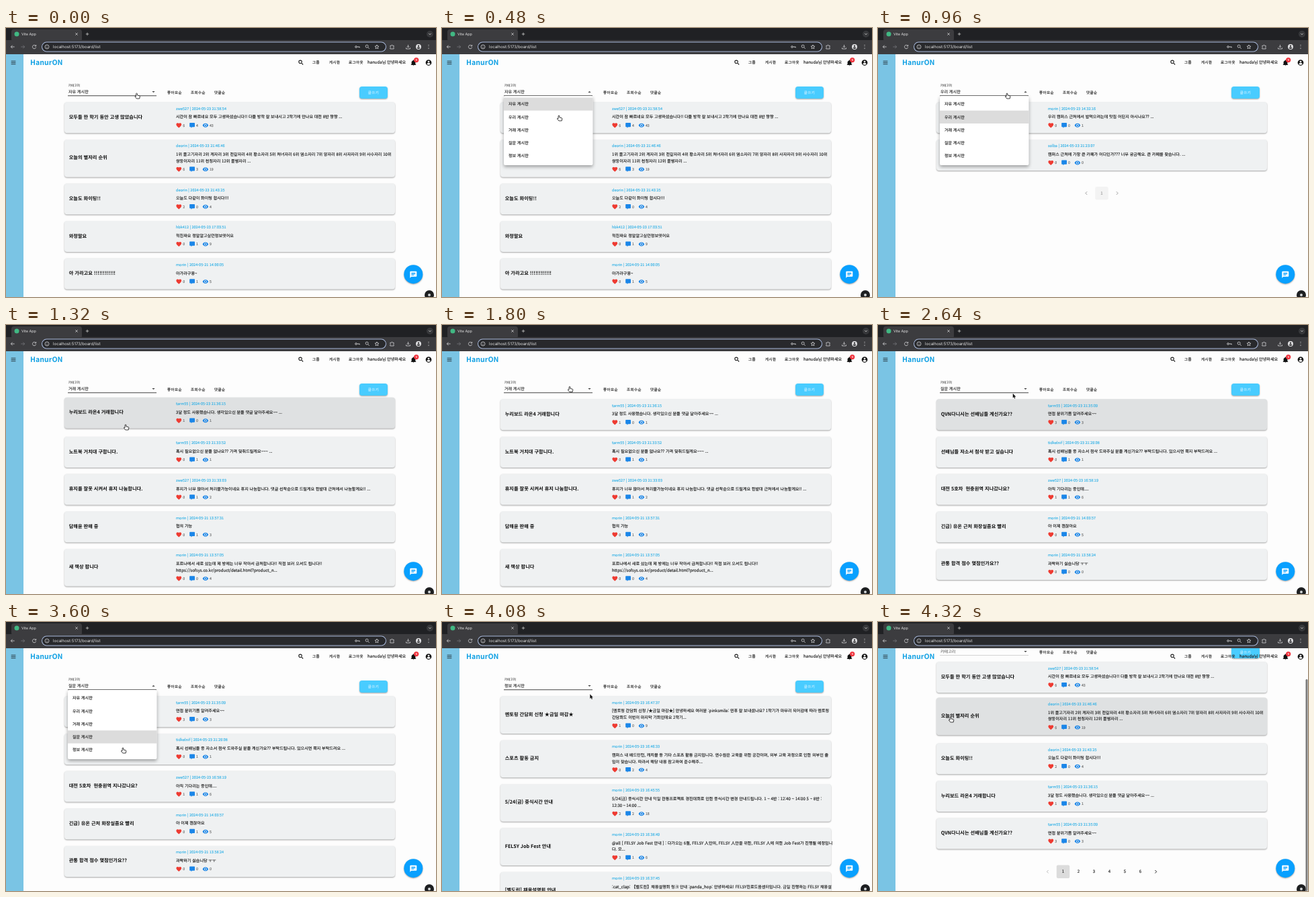
Write an HTML page with a canvas that moves like this. It is 640x400 px and loops after 4.44 s.

```html
<!DOCTYPE html>
<html lang="ko">
<head>
<meta charset="utf-8">
<title>Board</title>
<style>
html, body { margin: 0; width: 100%; height: 100%; overflow: hidden; background: #fdfdfd; }
canvas { display: block; width: 640px; height: 400px; }
</style>
</head>
<body>
<canvas id="stage"></canvas>
<script>
const LOOP = 4440, STEP = 120;
const KO = '"Noto Sans CJK KR", "Noto Sans CJK JP", "Noto Sans", sans-serif';
const UI = 'Inter, sans-serif';
const stage = document.getElementById('stage');
const c = stage.getContext('2d');
const dpr = window.devicePixelRatio || 1;
stage.width = 640 * dpr;
stage.height = 400 * dpr;

// Icons on a 24 unit grid
const ICON = {
  heart: 'M12 21.3l-1.4-1.3C5.4 15.4 2 12.3 2 8.5 2 5.4 4.4 3 7.5 3c1.7 0 3.4.8 4.5 2.1C13.1 3.8 14.8 3 16.5 3 19.6 3 22 5.4 22 8.5c0 3.8-3.4 6.9-8.6 11.5z',
  bubble: 'M20 2H4a2 2 0 0 0-2 2v12a2 2 0 0 0 2 2h4v4l4-4h8a2 2 0 0 0 2-2V4a2 2 0 0 0-2-2z',
  eye: 'M12 4.5C7 4.5 2.7 7.6 1 12c1.7 4.4 6 7.5 11 7.5s9.3-3.1 11-7.5C21.3 7.6 17 4.5 12 4.5zM12 17a5 5 0 1 1 0-10 5 5 0 0 1 0 10zm0-8a3 3 0 1 0 0 6 3 3 0 0 0 0-6z',
  bell: 'M21 19v1H3v-1l2-2v-6c0-3.1 2-5.8 5-6.7V4a2 2 0 0 1 4 0v.3c3 .9 5 3.6 5 6.7v6zM14 21a2 2 0 0 1-4 0z',
  user: 'M12 2a10 10 0 1 0 0 20 10 10 0 0 0 0-20zm0 3.5a3.3 3.3 0 1 1 0 6.6 3.3 3.3 0 0 1 0-6.6zM12 19.5c-2.5 0-4.8-1.3-6-3.2 0-2 4-3.1 6-3.1s6 1.1 6 3.1c-1.2 1.9-3.5 3.2-6 3.2z',
  chat: 'M20 2H4a2 2 0 0 0-2 2v18l4-4h14a2 2 0 0 0 2-2V4a2 2 0 0 0-2-2zM6 9h12v2H6zM14 14H6v-2h8zM18 8H6V6h12z',
  search: 'M15.5 9.5a6 6 0 1 1-12 0 6 6 0 0 1 12 0zM14 14l6.5 6.5',
  back: 'M20 12H4M11 5l-7 7 7 7',
  forward: 'M4 12h16M13 5l7 7-7 7',
  reload: 'M19 8a8 8 0 1 0 1 6M20 3v6h-6',
  info: 'M21 12a9 9 0 1 1-18 0 9 9 0 0 1 18 0zM12 11v6M12 7v1',
  star: 'M12 3l2.7 6 6.3.6-4.8 4.3 1.4 6.4L12 17l-5.6 3.3 1.4-6.4L3 9.6 9.3 9z',
  puzzle: 'M4 7h5a3 3 0 0 1 6 0h5v5a3 3 0 0 0 0 5v4H4v-5a3 3 0 0 0 0-5z',
  download: 'M12 3v11M7 10l5 5 5-5M3 16v5h18v-5',
  key: 'M2 12a4 4 0 1 0 8 0 4 4 0 1 0-8 0M10 12h12v4M18 12v3',
  close: 'M5 5l14 14M19 5L5 19',
  plus: 'M12 3v18M3 12h18',
  down: 'M6 9l6 6 6-6',
  left: 'M15 6l-6 6 6 6',
  right: 'M9 6l6 6-6 6',
  menu: 'M3 6h18M3 12h18M3 18h18',
  dots: 'M12 4v2M12 11v2M12 18v2'
};
const HAND = new Path2D('M-.9 .6Q0-.6 .9 .6V3L4 3.7Q5 4 4.8 5L4.2 8H-.2L-2.6 5Q-2.6 3.7-.9 4.6z');
const ARROW = new Path2D('M0 0V6.6L1.5 5.3 2.5 7.6 3.6 7.1 2.6 4.9H4.6z');

// title | author | time | likes, comments, views | body lines
const post = row => {
  const [title, author, time, counts, ...body] = row.split('|');
  return { title, meta: `${author} | 2024-05-${time}`, counts: counts.split(' '), body };
};
const free = [
  '모두들 한 학기 동안 고생 많았습니다|zwe527|23 21:58:54|6 4 43|시간이 참 빠르네요 모두 고생하셨습니다!! 다들 방학 잘 보내시고 2학기에 만나요 대전 8반 짱짱 ...',
  '오늘의 별자리 순위|deorin|23 21:46:46|6 3 19|1위 물고기자리 2위 게자리 3위 전갈자리 4위 황소자리 5위 처녀자리 6위 염소자리 7위 양자리 8위 사자자리 9위 사수자리 10위|쌍둥이자리 11위 천칭자리 12위 물병자리 ...',
  '오늘도 화이팅!!|deorin|23 21:43:25|2 0 4|오늘도 다같이 화이팅 합시다!!!',
  '와정말요|hbk412|23 17:03:51|0 1 9|헉진짜요 정말알고싶던정보엿어요',
  '아 가라고요 !!!!!!!!!!!!|morin|21 14:00:05|0 1 5|아가라구용~'
].map(post);
const trade = [
  '누리보드 라온4 거래합니다|tarm55|23 21:36:15|1 0 1|3달 정도 사용했습니다. 생각있으신 분들 댓글 달아주세요~~ ...',
  '노트북 거치대 구합니다.|tarm55|23 21:33:52|0 1 1|혹시 필요없으신 분들 없나요?? 가격 맞춰드릴게요~~~ ...',
  '휴지를 잘못 시켜서 휴지 나눔합니다.|zwe527|23 21:33:03|0 1 2|휴지가 너무 많아서 처리불가능이네요 휴지 나눔합니다. 댓글 선착순으로 드릴게요 한밭대 근처에서 나눔할게요!! ...',
  '담해윤 판매 중|morin|21 13:57:31|0 1 3|협의 가능',
  '새 책상 팝니다|morin|21 13:57:05|0 0 4|포르나에서 새로 샀는데 제 방에는 너무 작아서 급처합니다!! 직접 보러 오셔도 됩니다!!|https://sofsys.co.kr/product/detail.html?product_n...'
].map(post);
const ask = [
  'QVN다니시는 선배님들 계신가요??|tarm55|23 21:35:09|3 0 3|면접 분위기좀 알려주세요~~',
  '선배님들 자소서 첨삭 받고 싶습니다|tidkelnif|23 21:29:08|0 1 1|혹시 선배님들 중 자소서 첨삭 도와주실 분들 계신가요?? 부탁드립니다. 있으시면 쪽지 부탁드려요 ...',
  '대전 5호차  현충원역 지나갔나요?|zwe527|23 16:58:19|1 1 6|아직 기다리는 중인데....',
  '긴급) 유온 근처 화장실좀요 빨리|morin|21 14:03:57|0 1 5|아 이제 괜찮아요',
  '관통 합격 점수 몇점인가요??|morin|21 13:58:24|0 0 0|과락하기 싫습니당 ㅜㅜ'
].map(post);
const ours = [
  '점심 맛집 추천해주세요|morin|23 14:32:16|0 0 1|우리 캠퍼스 근처에서 밥먹으려는데 맛집 어딘지 아시나요?? ...',
  '카페 추천 받습니다|solba|23 21:23:07|0 0 0|캠퍼스 근처에 가장 큰 카페가 어디인가??? 너무 궁금해요. 큰 카페를 찾습니다. ...'
].map(post);
const news = [
  '멘토링 간담회 신청 ★금일 마감★|morin|23 16:47:37|1 0 9|[멘토링 간담회 신청 /★금일 마감★] 안녕하세요 여러분 :pinksmile: 연휴 잘 보내셨나요? 1학기가 마무리 되어감에 따라 멘토링|간담회도 이번이 마지막 기회인데요 2학기...',
  '스포츠 활동 금지|morin|23 16:46:33|0 2 4|캠퍼스 내 배드민턴, 캐치볼 등 기타 스포츠 활동 금지입니다. 연수원은 교육을 위한 공간이며, 외부 교육 과정으로 인한 외부인 출|입이 잦습니다. 따라서 해당 내용 참고하여 준수해주...',
  '5/24(금) 중식시간 안내|morin|23 16:45:55|2 2 18|5/24(금) 중식시간 안내 익일 관통프로젝트 경진대회로 인한 중식시간 변경 안내드립니다. 1 ~ 4반 : 12:40 ~ 14:00 5 ~ 8반 :|12:30 ~ 14:00 ...',
  'FELSY Job Fest 안내|morin|23 16:38:49|3 1 6|@all [ FELSY Job Fest 안내 ] : 다가오는 6월, FELSY 人만의, FELSY 人만을 위한, FELSY 人에 의한 Job Fest가 진행될 예정입니|다. 모...',
  '[벨도린] 채용설명회 안내|morin|23 16:37:45|1 0 5|:cat_clap: 【벨도린】채용설명회 링크 안내 :panda_hop: 안녕하세요! FELSY진로도움센터입니다. 금일 진행하는 FELSY 채용설|명회 링크 안내드립니다...'
].map(post);
const boards = { 자유: free, 우리: ours, 거래: trade, 질문: ask, 정보: news };
const all = [...free.slice(0, 3), trade[0], ask[0]];

// time, selected board, menu open
const STATES = [
  [0, '자유', 0], [120, '자유', 1], [600, '우리', 0], [960, '우리', 1], [1320, '거래', 0],
  [1920, '거래', 1], [2400, '질문', 0], [3360, '질문', 1], [3720, '정보', 0], [4200, '', 0]
];
// time, x, y of the pointer tip
const PATH = [
  [0, 194.5, 97], [120, 194, 97], [480, 174, 130], [600, 175, 129], [840, 192, 97], [960, 192, 97],
  [1200, 178, 148], [1320, 178, 148], [1560, 190, 91.5], [1920, 190, 91.5], [2280, 176, 167],
  [2400, 176, 167], [2640, 200.7, 101.8], [2880, 200.7, 101.8], [3120, 195, 95], [3360, 195, 95],
  [3600, 174, 187], [3720, 175, 186], [3960, 220.3, 107.3], [4080, 220.3, 107.3], [4320, 108, 141]
];

function pointer(t) {
  const i = PATH.findIndex(p => p[0] >= t);
  if (i < 1) return PATH[0].slice(1);
  const [a, b] = [PATH[i - 1], PATH[i]], k = (t - a[0]) / (b[0] - a[0]);
  return [1, 2].map(n => a[n] + (b[n] - a[n]) * k);
}

// y is the middle of the capitals; laid out at ten times the size for exact advances
function text(s, x, y, size, color, { weight = 400, font = KO, align = 'left', space = 0 } = {}) {
  c.save();
  c.translate(x, y + size * .36);
  c.scale(.1, .1);
  c.font = `${weight} ${size * 10}px ${font}`;
  c.textRendering = 'geometricPrecision';
  c.letterSpacing = space * 10 + 'px';
  c.textAlign = align;
  c.fillStyle = c.strokeStyle = color;
  c.fillText(s, 0, 0);
  // a hairline brings regular Korean text to a medium weight
  if (font === KO && weight === 400) {
    c.lineWidth = size * .25;
    c.lineJoin = 'round';
    c.strokeText(s, 0, 0);
  }
  c.restore();
}

function box(x, y, w, h, color, r = 0, shadow = 0) {
  c.save();
  if (shadow) {
    c.shadowColor = 'rgba(0,0,0,.35)';
    c.shadowBlur = shadow;
    c.shadowOffsetY = shadow / 2;
  }
  c.fillStyle = color;
  c.beginPath();
  c.roundRect(x, y, w, h, r);
  c.fill();
  c.restore();
}

const disc = (x, y, r, color, shadow) => box(x - r, y - r, 2 * r, 2 * r, color, r, shadow);

function icon(name, x, y, size, color, line = 0) {
  const path = new Path2D(ICON[name]), k = size / 24;
  c.save();
  c.translate(x - size / 2, y - size / 2);
  c.scale(k, k);
  c.fillStyle = c.strokeStyle = color;
  c.lineWidth = line / k;
  if (line) c.stroke(path); else c.fill(path, 'evenodd');
  c.restore();
}

function browser() {
  box(0, 0, 640, 18, '#202124');
  box(8, 2, 105, 18, '#3c3c3f', 4);
  box(0, 18, 640, 21, '#3c3c3f');
  disc(16, 9, 3.5, '#41b883');
  text('Vite App', 23, 9, 5.45, '#e3e3e3', { font: UI });
  icon('close', 105, 9, 6, '#ddd', .7);
  icon('plus', 121, 9, 6, '#ddd', .7);
  disc(631, 9, 5, '#37383b');
  icon('down', 631, 9, 7, '#ddd', .8);
  box(53, 20.5, 513, 15, '#a9b9dc', 7.5);
  box(54, 21.5, 511, 13, '#28292c', 6.5);
  text('localhost:5173/board/list', 70, 28, 6.1, '#e6e6e6', { font: UI });
  const tools = { back: 10, reload: 42, info: 61, key: 523, search: 538, star: 552, puzzle: 574.5, download: 598.5, dots: 629 };
  for (const name in tools) icon(name, tools[name], 28, 8, '#d5d5d7', name === 'dots' ? 1.4 : .8);
  icon('forward', 25, 28, 8, '#77787b', .8);
  icon('user', 614, 28, 9.5, '#e4e4e6');
}

function header() {
  box(0, 39, 26, 361, '#7ac4e4');
  icon('menu', 11, 51.5, 9, '#26343b', .9);
  text('HanurON', 36, 51.3, 10.6, '#12a1e4', { weight: 700 });
  icon('search', 439, 51.3, 9, '#222', 1.1);
  text('그룹', 456, 51.3, 5.5, '#222', { space: .4 });
  text('게시판', 481, 51.3, 5.5, '#222', { space: .4 });
  text('로그아웃', 510, 51.3, 5.5, '#222', { space: .4 });
  text('hanuda님 안녕하세요', 538, 51.3, 6.1, '#222');
  icon('bell', 606.5, 51.7, 10, '#111');
  disc(610.7, 47.6, 3.6, '#f0323c');
  text('9', 610.7, 47.6, 4.4, '#fff', { align: 'center' });
  icon('user', 629, 51.5, 10.5, '#111');
}

function filters(board, open) {
  if (board) {
    text('카테고리', 93, 85, 4.6, '#555');
    text(board + ' 게시판', 93, 94.5, 6.1, '#333');
    box(92, 100.3, 132, 1, '#444');
  } else {
    text('카테고리', 93, 94.5, 6.1, '#777');
    box(92, 100.5, 132, .5, '#aaa');
  }
  const d = open ? -1.1 : 1.1;
  c.fillStyle = '#444';
  c.beginPath();
  c.moveTo(217.3, 95 - d);
  c.lineTo(221.7, 95 - d);
  c.lineTo(219.5, 95 + d);
  c.fill();
  ['좋아요순', '조회수순', '댓글순'].forEach((s, i) => text(s, 240 + 35 * i, 95.6, 5.5, '#222', { space: .4 }));
  box(526, 87, 42, 18, '#49ccff', 4, 2);
  text('글쓰기', 547, 95.8, 5.5, '#c0ecff', { align: 'center', space: .4 });
}

function card(p, y, h, dark) {
  const extra = h - 46;
  box(87, y, 492, h, dark ? '#dfe1e2' : '#eff1f2', 4, 2);
  text(p.title, 93.7, y + 22 + extra / 2, 7.2, '#0c0c0c', { weight: 700 });
  text(p.meta, 253, y + 9.5, 5.5, '#2fb0e6');
  p.body.forEach((s, i) => text(s, 253, y + 22 + 9.7 * i, 6.1, '#1c1c1c'));
  ['heart', 'bubble', 'eye'].forEach((name, i) => {
    const x = 257.3 + 19.8 * i, mid = y + 34.5 + extra;
    icon(name, x, mid, 9.4, i ? '#1b86e8' : '#ee3b32');
    text(p.counts[i], x + 6, mid, 5.3, '#666');
  });
}

function pages(y, count) {
  const x = 333 - 11.5 * (count - 1), many = count > 1;
  icon('left', x - 23, y, 9, many ? '#bbb' : '#999', 1);
  box(x - 9.7, y - 9.7, 19.4, 19.4, many ? '#dcdcdc' : '#f3f3f3', 2);
  for (let i = 0; i < count; i++) text(i + 1, x + 23 * i, y, 6.1, many ? '#222' : '#999', { align: 'center' });
  icon('right', x + 23 * count, y, 9, many ? '#222' : '#999', 1);
}

function menu(board) {
  box(92, 101, 132.5, 103, '#fff', 2, 5);
  Object.keys(boards).forEach((name, i) => {
    const y = 113.2 + 19.2 * i;
    if (name === board) box(92, y - 9.6, 132.5, 19.2, '#dcdcdc');
    text(name + ' 게시판', 99, y, 6.1, '#222');
  });
}

function cursor(x, y, hand) {
  const path = hand ? HAND : ARROW;
  c.save();
  c.translate(x, y);
  c.lineWidth = hand ? .8 : 1;
  c.fillStyle = hand ? '#fff' : '#111';
  c.strokeStyle = hand ? '#111' : '#fff';
  if (hand) { c.fill(path); c.stroke(path); } else { c.stroke(path); c.fill(path); }
  c.restore();
}

function draw(t) {
  const [, board, open] = STATES.filter(s => s[0] <= t).pop();
  const scroll = t >= 4320 ? 51 : 0;
  const [x, y] = pointer(t), [, lastY] = pointer(t - STEP);
  let hand = open || (y > 80 && y < 101 && x < 224);

  c.setTransform(dpr, 0, 0, dpr, 0, 0);
  box(0, 0, 640, 400, '#fdfdfd');
  c.save();
  c.translate(0, -scroll);
  filters(board, open);
  let top = 110.3;
  for (const p of boards[board] || all) {
    const h = 46 + 9.7 * (p.body.length - 1);
    const inside = at => !open && at + scroll > top && at + scroll < top + h;
    // the lift is immediate, the shade fades one step later
    card(p, top - (inside(y) ? 2.5 : 0), h, inside(lastY));
    hand = hand || inside(y);
    top += h + 9.65;
  }
  pages(top + 24, board ? 1 : 6);
  c.restore();

  header();
  if (open) menu(board);
  disc(606.3, 366.2, 14, '#08a0ff', 2);
  icon('chat', 606.3, 366.7, 12, '#fff');
  disc(630, 397, 7, '#1d1f21');
  disc(630, 397, 2, '#d0d4d6');
  if (scroll) box(636.5, 85, 3, 315, '#7c7c7c', 1.5);
  browser();
  cursor(x, y, hand);
}

const start = performance.now();
function tick() {
  const t = (performance.now() - start) % LOOP;
  draw(Math.floor(t / STEP) * STEP);
  requestAnimationFrame(tick);
}
tick();
</script>
</body>
</html>
```
